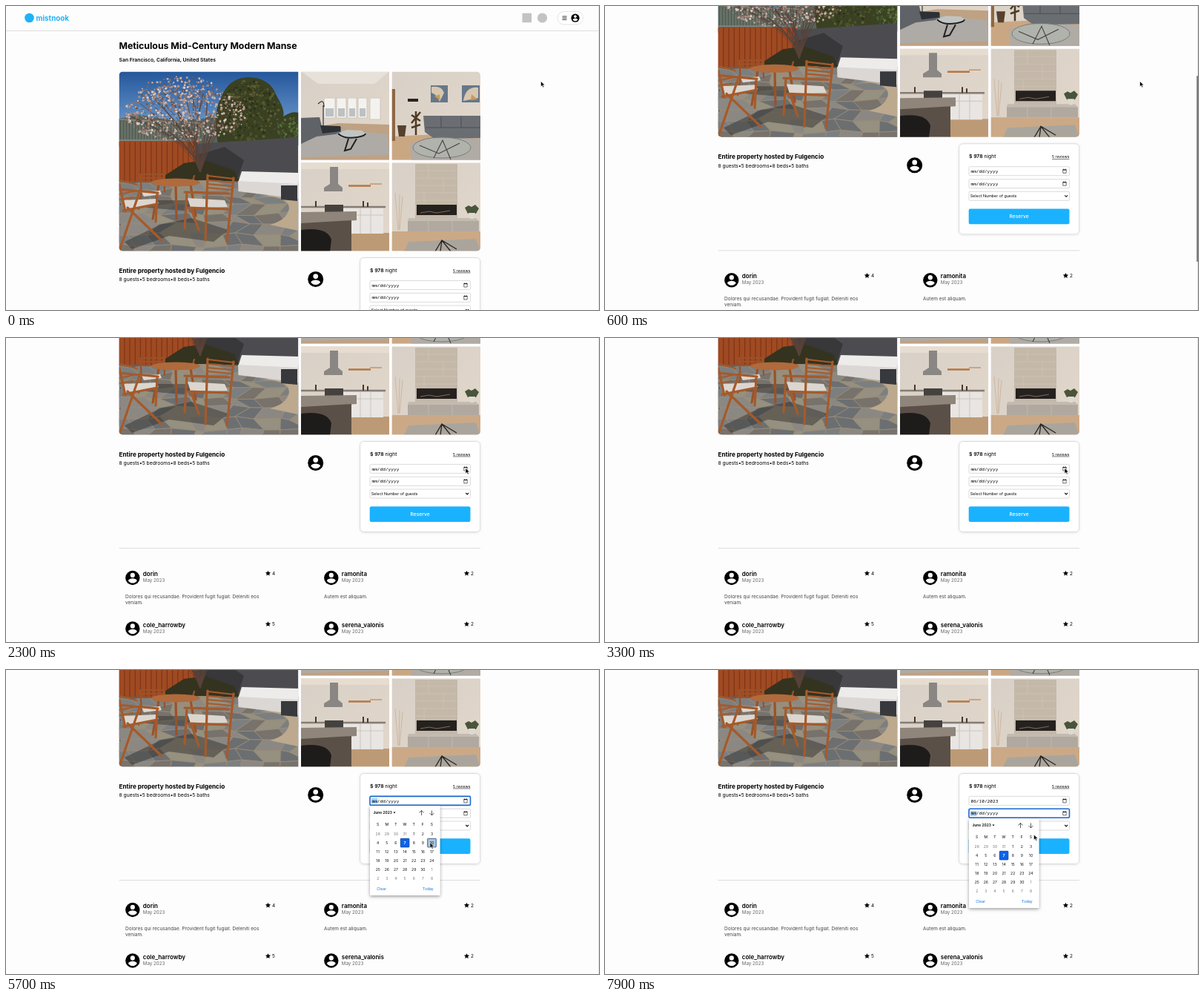
These frames come from a looping animation (800 by 410 pixels, 8000 ms). An HTML page:

```html
<!DOCTYPE html>
<html lang="en">
<head>
<meta charset="utf-8">
<title>Property booking</title>
<style>
html, body { margin: 0; width: 100%; height: 100%; overflow: hidden; background: #fefdfe; }
svg { display: block; font-family: Inter, Roboto, sans-serif; }
.mono { font-family: "Noto Sans Mono", "DejaVu Sans Mono", monospace; }
.mid { text-anchor: middle; }
</style>
</head>
<body>
<svg id="stage" width="800" height="410" viewBox="0 0 800 410">
<defs>
  <linearGradient id="sky" x2="0" y2="1"><stop stop-color="#24579b"/><stop offset="1" stop-color="#83aedb"/></linearGradient>
  <linearGradient id="wall" x2="1" y2="1"><stop stop-color="#d8d0c7"/><stop offset="1" stop-color="#e2d7ca"/></linearGradient>
  <filter id="soft" x="-20%" y="-20%" width="140%" height="140%"><feDropShadow dx="0" dy=".6" stdDeviation="1.4" flood-opacity=".12"/></filter>
  <filter id="lift" x="-20%" y="-20%" width="140%" height="140%"><feDropShadow dx="0" dy="1.5" stdDeviation="2.2" flood-opacity=".4"/></filter>
  <clipPath id="frame"><rect x="152.5" y="88.5" width="487.5" height="242" rx="5"/></clipPath>
  <clipPath id="c0"><rect x="152.5" y="88.5" width="242" height="242"/></clipPath>
  <clipPath id="c1"><rect x="398" y="88.5" width="119" height="119"/></clipPath>
  <clipPath id="c2"><rect x="520.5" y="88.5" width="119.5" height="119"/></clipPath>
  <clipPath id="c3"><rect x="398" y="211.5" width="119" height="119"/></clipPath>
  <clipPath id="c4"><rect x="520.5" y="211.5" width="119.5" height="119"/></clipPath>
  <g id="user"><circle r="10"/><circle cy="-3.7" r="3.2" fill="#fff"/><path fill="#fff" d="M0 7.2C-2.500 7.200-4.700 5.900-6 4-6 2-2 .9 0 .9S6 2 6 4C4.700 5.900 2.500 7.200 0 7.200z"/></g>
  <path id="star" d="M0-3.6 1.1-1.3 3.6-1 1.7.8 2.2 3.3 0 2-2.2 3.3-1.7.8-3.6-1-1.1-1.3z"/>
</defs>
<g id="page">
  <path d="M0 33.5H800" stroke="#ddd"/>
  <circle cx="31.5" cy="16" r="6.3" fill="#1fb2f5"/>
  <rect x="696.5" y="9.7" width="12.5" height="12.5" fill="#c3c3c3"/>
  <circle cx="723.5" cy="16" r="6.6" fill="#c3c3c3"/>
  <rect x="744" y="7.5" width="34.5" height="17.5" rx="8.7" fill="#fff" stroke="#ddd" stroke-width=".8"/>
  <path d="M750.5 14h6M750.5 16.2h6M750.5 18.4h6" stroke="#222" stroke-width=".9"/>
  <use href="#user" transform="translate(768 16.2) scale(.56)"/>
  <g clip-path="url(#frame)">
    <g clip-path="url(#c0)">
      <path fill="url(#sky)" d="M152 88h243v100H152z"/>
      <path fill="#59645a" d="M152 152l30-5 45 8 60-5v40H152z"/>
      <path fill="#3a4123" d="M286 186q-8-40 4-62 10-27 36-28 30 0 39 25 12 20 9 28 12-8 21-5v44z"/>
      <g id="leaves"></g>
      <path d="M152 153 265 158M152 181 265 181" stroke="#8d8a80" stroke-width="1.5"/>
      <path d="M152 168H265" stroke="#a5a499" stroke-width="25" stroke-dasharray="1 3" opacity=".4"/>
      <path fill="#a04a22" d="M152 183h108v54H152z"/>
      <path d="M152 210H260" stroke="#6e2d16" stroke-width="54" stroke-dasharray="1.2 6" opacity=".7"/>
      <path fill="#4c4c50" d="M255 186 394.5 177v66H255z"/>
      <path fill="#2f2e2f" d="M255 202l40-12 26 18-8 24h-58z" opacity=".7"/>
      <path fill="#34331f" d="M215 228l25-16 28-4 40 14 8 17H215z"/>
      <g id="tree"></g>
      <path fill="#65605a" d="M152 236h243v96H152z"/>
      <g id="stones"></g>
      <path fill="#bca98e" d="M340 256q42 0 42 17-3 16-26 22l38 8v-50z"/>
      <path fill="#eeecea" d="M318 223l76.500 2v16l-81-4z"/>
      <path fill="#dad7d5" d="M313 236l81.500 4v20l-81-10z"/>
      <path fill="#37393d" d="M371 242h22v21l-22-2z"/>
      <path fill="#2c2926" opacity=".45" d="M160 318l50-24 40-8 50 16-20 16-60-8-50 18zM180 262h80l-20 14-50-4z"/>
      <g fill="none" stroke="#9a5228" stroke-linecap="round">
        <path stroke-width="2.200" d="M181 227h32M180 232h32M182 237h28M181 227l2 27M213 227l1 23M183 250l-4 24M254 229l-3 10"/>
        <path stroke-width="3.200" d="M206 241l-8 46M229 243l1 44M249 241l7 42"/>
      </g>
      <ellipse cx="229" cy="238" rx="33" ry="5.500" fill="#b06a3c"/>
      <path fill="#dcd6d0" d="M183 251l25-2 2 5-24 3zM245 259l50 3 4 9-50 1zM157 262l46-2 3 6-44 10z"/>
      <g fill="none" stroke="#a55a2b" stroke-linecap="round" stroke-linejoin="round">
        <path stroke-width="3.200" d="M272 228l-3 88M307 232l-9 86M241 251l60 2M244 252l-3 48M245 272l54 2M250 274l10 28"/>
        <path stroke-width="2.200" d="M273 229l34 4M272 235l34 3M272 240l33 3M271 245l33 3"/>
        <path stroke-width="3.200" d="M153 241l8 36M152 247l53 5M181 248l-27 79M164 272l46 44M204 253l-2 38M158 276l46-9"/>
        <path stroke-width="2.200" d="M153 235l23 6M153 254l20-4M153 261l18-3"/>
      </g>
    </g>
    <g clip-path="url(#c1)">
      <path fill="url(#wall)" d="M398 88h119v120H398z"/>
      <path fill="#e8e1d9" d="M398 88h119l-20 17h-76z"/>
      <path fill="#bfa183" d="M398 166l50-8 69 2v48H398z"/>
      <path fill="#aeaba6" d="M398 182l55-15 62 6 2 28-119 3z"/>
      <path fill="#f4f2ef" stroke="#cfc7be" d="M429 124h15v27h-15zM446 124h13v27h-13zM461 124h12v27h-12zM475 124h12v27h-12zM491 124h14v29h-14z"/>
      <path fill="#bcc1c3" d="M431 138h11v11h-11zM448 138h9v11h-9zM463 138h8v11h-8zM477 138h8v11h-8z"/>
      <path fill="#5f6266" d="M398 151l25-1 3 12 26 1v9l-33 4-21 10z"/>
      <path fill="#2d3034" d="M424 161l27 1v7l-24 3z"/>
      <path d="M421 132q8-8 8 4M428 134v28" fill="none" stroke="#292725" stroke-width="1.100"/>
      <path fill="#c0c5c3" d="M446 172l14-5 20 1 6 5-13 6-20-1z"/>
      <path d="M448 172q8 8 26 5 11-2 11-5M462 179l-5 16 8-2 8-14" fill="none" stroke="#211f1e" stroke-width="2"/>
    </g>
    <g clip-path="url(#c2)">
      <path fill="url(#wall)" d="M520 88h120v120H520z"/>
      <path fill="#caa783" d="M520 176l120-6v38H520z"/>
      <path fill="#b0aba4" d="M545 185l50-12 45 7v28h-93z"/>
      <path fill="#8d6744" d="M520 112h5v70h-5z"/>
      <path fill="#66778b" d="M573 107h23v23h-23zM615 107h24v23h-24z"/>
      <path fill="#d7c7ae" d="M574 109q14-2 17 8l-6 12q-4-10-11-12zM617 128q3-20 20-18v14z"/>
      <path fill="#c99b55" d="M578 122l7-3 1 8zM628 119l8 7-9 1z"/>
      <path fill="#282522" d="M542 125h14v4h-14z"/>
      <path d="M553 174v-32M547 147l12 8M559 143l-12 15M547 164l12-4" stroke="#4c3b25" stroke-width="2.500"/>
      <path fill="#56412f" d="M528 161h12l-2 15h-8z"/>
      <path fill="#6a6e72" d="M563 148h77v30l-62 1-13-9z"/>
      <path d="M566 164h74M587 149v15M614 149v15" stroke="#4b4f54"/>
      <ellipse cx="588" cy="191" rx="39" ry="14" fill="#b0b4ae" opacity=".85" stroke="#71766f"/>
      <path d="M558 188l26 11 28-14M577 205l12-24 11 26" fill="none" stroke="#45423f" stroke-width="1.100"/>
    </g>
    <g clip-path="url(#c3)">
      <path fill="url(#wall)" d="M398 211h119v120H398z"/>
      <path fill="#e6dcd0" d="M398 211h119v9H398z"/>
      <path fill="#8a8683" d="M437 217h11v23l6 5v5h-25v-5l8-5z"/>
      <path d="M462 242.500h30" stroke="#b47745" stroke-width="2.500"/>
      <path d="M491 240h16" stroke="#c79468" stroke-width="1.500"/>
      <path fill="#bd9a76" d="M465 306h52v25h-52z"/>
      <path fill="#e9e5e2" d="M451 273h58v34h-58z"/>
      <path d="M478 273v34M492 273v34M451 282h58" stroke="#c5beb7" stroke-width=".8"/>
      <path d="M398 271H512" stroke="#857e77" stroke-width="2.500"/>
      <path fill="#45413e" d="M430 268h25v20h-25z"/>
      <path d="M418 263v8M482 263v8M488 265v6" stroke="#49372a" stroke-width="2"/>
      <path fill="#8f857a" d="M398 278l75-1v12l-75 5z"/>
      <path fill="#5a5048" d="M398 293l68-4v42h-68z"/>
      <path fill="#1e1b1b" d="M398 302q35-5 41 13l-2 16h-39z"/>
    </g>
    <g clip-path="url(#c4)">
      <path fill="url(#wall)" d="M520 211h120v120H520z"/>
      <path fill="#cba987" d="M520 304h120v27H520z"/>
      <path fill="#c4b8a9" d="M552 213h57v75h-57z"/>
      <path d="M552 222h57M552 232h57M552 242h57M552 252h57M552 262h57M570 213v19M590 232v20M564 252v16" stroke="#d0c5b8" stroke-width=".7"/>
      <path fill="#25211f" d="M554 268h54v14h-54z"/>
      <path d="M559 279l12-2 10 2 18-3" fill="none" stroke="#816b56"/>
      <path fill="#c3bab0" d="M543 286h91l4 4h-96z"/>
      <path fill="#b1a99f" d="M542 290h96v14h-96z"/>
      <path d="M570 290v14M602 290v14" stroke="#c0b8ae"/>
      <path d="M529 302l-4-50M530 302l1-48M531 302l4-45" stroke="#c7ab8d" stroke-width=".7"/>
      <path fill="#49553a" d="M619 272l5-3 4 2 5-3 5 5-4 7h-11z"/>
      <path fill="#ded9d1" d="M624 279h9l-2 8h-5z"/>
      <path fill="#aaa59c" d="M543 318l91-4 6 17H537z"/>
      <path d="M579 331l9-15 12 15M588 316l-2 15M588 316l20 12" fill="none" stroke="#252321" stroke-width="1.300"/>
    </g>
    <path d="M396.250 88V331M518.750 88V331" stroke="#fefdfe" stroke-width="3.500"/>
  </g>
  <use href="#user" transform="translate(417.7 368.500) scale(1.05)"/>
  <rect x="477.700" y="339.500" width="162" height="122" rx="5" fill="#fff" stroke="#d8d8d8" stroke-width=".9" filter="url(#soft)"/>
  <rect x="490.700" y="427.300" width="135.800" height="20.700" rx="2" fill="#1ab2ff"/>
  <path d="M152.500 483.500H640" stroke="#ddd"/>
  <g id="content"></g>
  <g id="form"></g>
</g>
<g id="calendar" filter="url(#lift)"></g>
<path d="M799.500 0V410" stroke="#e3e2e3"/>
<rect id="thumb" x="798.200" width="1.800" height="251" rx=".9" fill="#777"/>
<path id="cursor" d="M0 0v7.300l1.800-1.600 1.200 2.700 1.300-.6-1.200-2.600h2.400z" fill="#000" stroke="#fff" stroke-width=".6"/>
</svg>
<script>
const $ = id => document.getElementById(id);
const text = (x, y, size, str, attrs = '') => `<text x="${x}" y="${y}" font-size="${size}" ${attrs}>${str}</text>`;
const rect = (x, y, w, h, attrs) => `<rect x="${x}" y="${y}" width="${w}" height="${h}" ${attrs}/>`;
const semibold = 'font-weight="600"', bold = 'font-weight="700"';

let seed = 71;
const rnd = (a = 1, b = 0) => b + (a - b) * ((seed = seed * 16807 % 2147483647) / 2147483647);
const pick = list => list[Math.floor(rnd(list.length))];

// Scatters dots evenly over an ellipse.
function dots(count, cx, cy, rx, ry, size, colors) {
  let out = '';
  for (let i = 0; i < count; i++) {
    const a = rnd(Math.PI * 2), r = Math.sqrt(rnd());
    out += `<circle cx="${cx + rx * r * Math.cos(a)}" cy="${cy + ry * r * Math.sin(a)}" r="${rnd(size, .6)}" fill="${pick(colors)}"/>`;
  }
  return out;
}

function drawTree() {
  let out = '';
  for (let i = 0; i < 24; i++) {
    const x = 162 + i * 6.5, y = rnd(160, 108);
    out += `<path d="M262 224Q${rnd(278, 245)} 185 ${x} ${y}" fill="none" stroke="#584239" stroke-width="${rnd(1.8, .6)}"/>`;
  }
  const petals = ['#cbb0a6', '#a98a7f', '#8c7067', '#dcc9c1', '#6d564c', '#b8978b'];
  return out + dots(650, 242, 145, 82, 38, 1.8, petals) + dots(240, 235, 118, 56, 23, 1.6, petals);
}

function drawStones() {
  const cols = 11, rows = 8, points = [];
  for (let j = 0; j <= rows; j++)
    for (let i = 0; i <= cols; i++)
      points.push([140 + i * 25 + j % 2 * 10 + rnd(8, -8), 238 + j * (8 + j * .6) + rnd(3, -3)]);
  let out = '';
  for (let j = 0; j < rows; j++)
    for (let i = 0; i < cols; i++) {
      const k = j * (cols + 1) + i;
      const corners = [k, k + 1, k + cols + 2, k + cols + 1].map(n => points[n]);
      out += `<polygon points="${corners.join(' ')}" fill="${pick(['#7c7f80', '#6c6f71', '#8b8883', '#77726b', '#95907f'])}" stroke="#9b8d79" stroke-width=".9" stroke-linejoin="round"/>`;
    }
  return out;
}

function review(x, y, name, rating, lines) {
  return `<use href="#user" transform="translate(${x + 9.8} ${y + 2.5}) scale(.97)"/>` +
    text(x + 23.8, y, 8, name, semibold) +
    text(x + 23.8, y + 8, 6.2, 'May 2023', 'fill="#666"') +
    `<use href="#star" x="${x + 192.5}" y="${y - 3.7}"/>` + text(x + 198, y - 1.3, 6.5, rating) +
    lines.map((line, i) => text(x, y + 29.5 + i * 8.3, 6.5, line, 'fill="#444"')).join('');
}

$('leaves').innerHTML = dots(420, 330, 142, 40, 42, 2, ['#2b3119', '#4b5229', '#5d5c32', '#363d20']) +
  dots(90, 382, 166, 15, 17, 2, ['#4b5f30', '#5f7440', '#394a26']);
$('tree').innerHTML = drawTree();
$('stones').innerHTML = drawStones();
$('content').innerHTML =
  text(40.5, 19.7, 9.8, 'mistnook', bold + ' fill="#1fb2f5"') +
  text(152.5, 58, 12.3, 'Meticulous Mid-Century Modern Manse', bold) +
  text(152.5, 74.5, 6.85, 'San Francisco, California, United States', semibold) +
  text(152.5, 359.7, 8.2, 'Entire property hosted by Fulgencio', bold) +
  text(152.5, 371.3, 6.75, '8 guests•5 bedrooms•8 beds•5 baths') +
  text(491, 359, 6.8, `<tspan ${semibold}>$ 978</tspan> night`) +
  text(603, 358.7, 5.2, '5 reviews', 'text-decoration="underline"') +
  text(558.6, 440, 6.7, 'Reserve', 'class="mid" fill="#fff" font-weight="500"') +
  review(161, 521, 'dorin', 4, ['Dolores qui recusandae. Provident fugit fugiat. Deleniti eos', 'veniam.']) +
  review(429, 521, 'ramonita', 2, ['Autem est aliquam.']) +
  review(161, 589.5, 'cole_harrowby', 5, []) +
  review(429, 589.5, 'serena_valonis', 2, []);

function dateField(y, value, focused, selected) {
  return rect(491, y, 135.5, 12, `rx="1.5" fill="#fff" stroke="${focused ? '#1767cf' : '#ccc'}" stroke-width="${focused ? 1.6 : .7}"`) +
    (selected ? rect(493, y + 2.6, 8.3, 7, 'fill="#a5cbf5"') : '') +
    text(493.5, y + 8.1, 6.15, value, 'class="mono"') +
    `<path d="M617.8 ${y + 4.2}h4.400v4.400h-4.400z" fill="none" stroke="#111" stroke-width=".6"/>` +
    `<path d="M617.500 ${y + 4.2}h5M618.700 ${y + 3}v.8M621.300 ${y + 3}v.8" stroke="#111" stroke-width=".9"/>`;
}

function drawForm(open, focus, picked) {
  const blank = 'mm/dd/yyyy';
  return dateField(370.4, picked ? '06/10/2023' : blank, focus === 1, open === 1) +
    dateField(387.3, blank, focus === 2, open === 2) +
    rect(491, 404, 135.5, 12, 'rx="1.5" fill="#fff" stroke="#ccc" stroke-width=".7"') +
    text(492.7, 412, 5.35, 'Select Number of guests') +
    '<path d="M620.300 409l1.900 2 1.900-2" fill="none" stroke="#111" stroke-width="1.100"/>';
}

const cell = 12.13;
function drawCalendar(top, mx, my) {
  let out = rect(491, top, 94.5, 121, 'rx="1" fill="#fff"') +
    text(495.5, top + 11.3, 4.9, 'June 2023', semibold) +
    `<path d="M522.500 ${top + 8.500}h3l-1.500 2z"/>` +
    `<path d="M560.500 ${top + 13}v-6.500m-3 3 3-3 3 3M574.500 ${top + 6.500}v6.500m-3-3 3 3 3-3" fill="none" stroke="#333" stroke-width=".8"/>`;
  [...'SMTWTFS'].forEach((d, i) => out += text(501.7 + i * cell, top + 27.2, 5.1, d, 'class="mid"'));
  for (let i = 0; i < 42; i++) {
    const n = i - 3, inside = n > 0 && n <= 30, today = n === 7;
    const x = 501.7 + i % 7 * cell, y = top + 38 + Math.floor(i / 7) * cell;
    const hover = Math.abs(mx - x) < cell / 2 && Math.abs(my - y) < cell / 2;
    if (today || hover)
      out += rect(x - 5.8, y - 5.8, 11.6, 11.6, `rx=".6" fill="${today ? '#0b63ea' : '#a9c7df'}" stroke="${today ? '#0a3f9b' : '#24486d'}" stroke-width=".8"`);
    out += text(x, y + 1.8, 5.1, inside ? n : n < 1 ? n + 31 : n - 30,
      `class="mid" fill="${today ? '#fff' : inside ? '#111' : '#777'}" font-weight="${today ? 700 : 400}"`);
  }
  return out + text(500.3, top + 113.8, 5.1, 'Clear', 'fill="#1473dc"') +
    text(562, top + 113.8, 5.1, 'Today', 'fill="#1473dc"');
}

// Interpolates rows of [time, ...values].
function track(keys, t, ease = p => p) {
  const i = keys.findIndex(k => k[0] > t);
  if (i < 0) return keys.at(-1).slice(1);
  const a = keys[i - 1], b = keys[i], p = ease((t - a[0]) / (b[0] - a[0]));
  return a.slice(1).map((v, n) => v + (b[n + 1] - v) * p);
}
const smooth = p => p * p * (3 - 2 * p);
const scrollKeys = [[0, 0], [100, 10], [200, 44], [300, 83], [400, 113], [600, 153.7], [800, 179], [1000, 195.7], [1200, 199], [1400, 200]];
const cursorKeys = [[0, 721.5, 101.5], [1500, 721.5, 101.5], [2200, 620, 175.5], [4500, 620, 175.5], [5500, 572, 232.8],
  [6300, 572, 232.8], [7100, 620, 192.5], [7500, 620, 192.5], [7900, 578.5, 222]];

let lastState = '';
function draw(now) {
  const t = Math.floor(now % 8000 / 100) * 100;
  const [scroll] = track(scrollKeys, t);
  const [x, y] = track(cursorKeys, t, smooth);
  const open = t >= 3900 && t < 6200 ? 1 : t >= 7400 ? 2 : 0;
  const focus = t < 3900 ? 0 : t < 7400 ? 1 : 2;
  $('page').setAttribute('transform', `translate(0 ${-scroll})`);
  $('cursor').setAttribute('transform', `translate(${x} ${y})`);
  $('thumb').setAttribute('y', scroll * .612);
  $('thumb').setAttribute('opacity', t < 100 ? 0 : Math.max(0, Math.min(1, (2200 - t) / 300)));
  const state = [open, focus, x, y].join();
  if (state !== lastState) {
    lastState = state;
    $('form').innerHTML = drawForm(open, focus, t >= 6200);
    $('calendar').innerHTML = open ? drawCalendar(open === 1 ? 183 : 200, x, y) : '';
  }
  requestAnimationFrame(draw);
}
requestAnimationFrame(draw);
</script>
</body>
</html>
```
